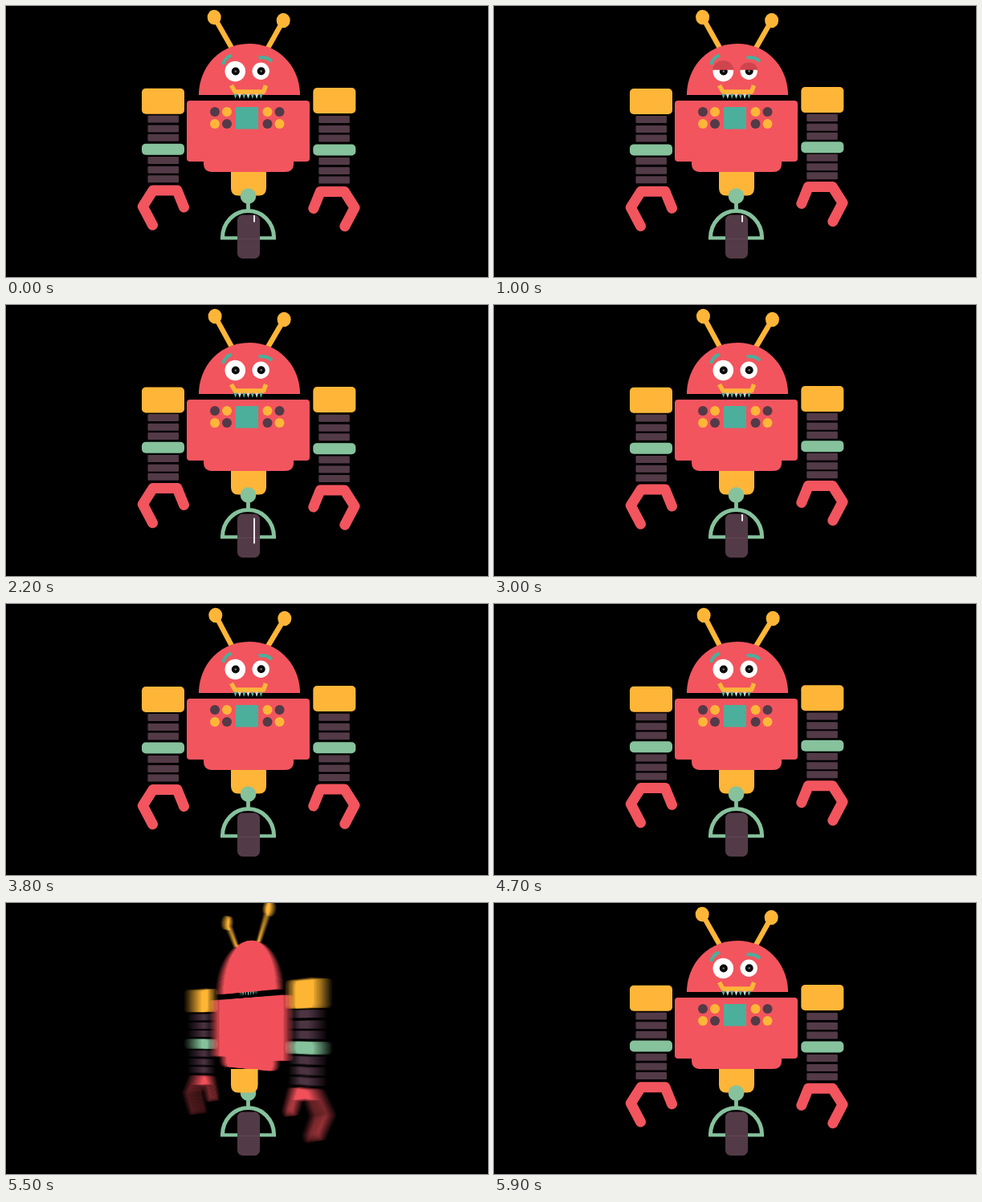
Write an HTML page that moves like this. It is 600x338 px and loops after 6000 ms.

```html
<!DOCTYPE html>
<html lang="en">
<head>
<meta charset="utf-8">
<title>Robot on one wheel</title>
<style>
html, body { margin: 0; width: 100%; height: 100%; overflow: hidden; background: #000; }
#stage { position: relative; width: 600px; height: 338px; overflow: hidden; background: #000; }
.layer { position: absolute; inset: 0; background: #000; perspective: 690px; perspective-origin: 301.5px 158px; }
.layer svg { transform-origin: 301.5px 158px; }
svg { position: absolute; left: 0; top: 0; display: block; overflow: visible; }
</style>
</head>
<body>
<div id="stage"></div>
<script>
const LOOP = 6000, STEP = 100, SAMPLES = 12;
const SPIN_START = 5240, SPIN_TIME = 650, SHUTTER = 15;
const RED = '#f2555e', GOLD = '#ffb638', DARK = '#533a47', MINT = '#86c29c', TEAL = '#4caf9b', LID = '#d0444e';
const NS = 'http://www.w3.org/2000/svg';
const TAU = Math.PI * 2;
const stage = document.getElementById('stage');

function addSvg(parent) {
  const svg = document.createElementNS(NS, 'svg');
  svg.setAttribute('width', 600);
  svg.setAttribute('height', 338);
  parent.appendChild(svg);
  return svg;
}

// Layer i at opacity 1/(i+1) averages all samples into motion blur.
const layers = Array.from({ length: SAMPLES }, (_, i) => {
  const box = document.createElement('div');
  box.className = 'layer';
  box.style.opacity = 1 / (i + 1);
  stage.appendChild(box);
  return { box, svg: addSvg(box) };
});
const base = addSvg(stage);

const clamp = v => Math.max(0, Math.min(1, v));
const rect = (x, y, w, h, r, fill) =>
  `<rect x="${x}" y="${y}" width="${w}" height="${h}" rx="${r}" fill="${fill}"/>`;
const oval = (x, y, rx, ry, fill) =>
  `<ellipse cx="${x}" cy="${y}" rx="${rx}" ry="${ry}" fill="${fill}"/>`;
const dot = (x, y, r, fill) => oval(x, y, r, r, fill);
const line = (d, width, color, cap = 'round') =>
  `<path d="${d}" fill="none" stroke="${color}" stroke-width="${width}" stroke-linecap="${cap}" stroke-linejoin="round"/>`;
const shape = (d, fill) => `<path d="${d}" fill="${fill}"/>`;

function spin(t) {
  const u = clamp((t - SPIN_START) / SPIN_TIME);
  return u * u * (3 - 2 * u);
}

// The arm contracts upward by `lift` at the claw, less toward the shoulder.
function arm(top, lift) {
  const y = v => v - lift * (0.15 + 0.85 * Math.pow((v - 102) / 123, 1.3));
  const bars = [137, 149, 160.5, 189, 201, 212.5]
    .map(v => rect(176.5, y(v), 38.5, 9, 1, DARK)).join('');
  return bars + rect(169, y(102) + top, 53, 32, 5, GOLD) + rect(169, y(172.5), 53, 14, 5, MINT) +
    `<g transform="translate(0 ${y(225)})">` +
    line('M182.5 49.8L170.3 26.5L183 6.5H213L221.5 27.5', 13, RED) + '</g>';
}

function antenna(x, y, footX, footY) {
  return line(`M${x} ${y}L${footX} ${footY}`, 6.5, GOLD, 'butt') + oval(x, y, 8.5, 9.3, GOLD);
}

function eye(x, y, r, shut) {
  let out = dot(x, y, r, '#fff') + dot(x + 0.5, y, 5, '#0a0a0a') + dot(x + 0.5, y, 1.2, '#777');
  if (shut > 0) {
    const R = r + 0.7, edge = y - R + 2 * R * shut;
    const half = Math.sqrt(Math.max(0, R * R - (edge - y) ** 2));
    out += shut >= 1 ? dot(x, y, R, LID)
      : shape(`M${x - half} ${edge}A${R} ${R} 0 ${shut > 0.5 ? 1 : 0} 1 ${x + half} ${edge}Z`, LID);
  }
  return out;
}

function teeth() {
  let out = '';
  for (let i = 0; i < 7; i++) {
    const x = 283 + i * 5.3;
    out += shape(`M${x} 108h5.2l-2.6 7.5z`, i % 2 ? '#b9d8d0' : TEAL);
  }
  return out;
}

function face(shut) {
  const buttons = [[260, 132, 0], [275, 132, 1], [260, 147, 1], [275, 147, 0],
    [325.5, 132, 1], [340.5, 132, 0], [325.5, 147, 0], [340.5, 147, 1]]
    .map(([x, y, lit]) => dot(x, y, 6, lit ? GOLD : DARK)).join('');
  return eye(285.3, 81.5, 12.8, shut) + eye(317.2, 81.3, 10.7, shut) +
    line('M270 73Q272 64.5 281 61.5', 4.2, TEAL, 'butt') +
    line('M314.5 64.5Q324 63 331 69', 4.2, TEAL, 'butt') +
    teeth() + line('M280.5 99L285 107H320.5L323.5 99', 5.6, GOLD, 'butt') +
    buttons + rect(286, 126, 28, 27.5, 0.5, TEAL);
}

function body(t, back) {
  const sway = t / 2400 * (1 - spin(t));
  const shut = clamp(1 - Math.abs(t - 1110) / 195);
  const leftLift = 1.5 - 1.5 * Math.sin(TAU * t / 3000);
  const rightLift = 3 - 3 * Math.cos(TAU * t / 2000);
  return arm(1, leftLift) +
    `<g transform="translate(604.3 0) scale(-1 1)">${arm(0, rightLift)}</g>` +
    antenna(259.2 + sway, 14, 282, 54) + antenna(345.2 + sway, 18, 324, 56) +
    teeth() + shape('M240 111V108C242 73 268 47 303 47S364 73 366 108V111Z', RED) +
    shape('M229 118H374Q378 118 378 122V190Q378 194 374 194H358V197Q358 207 347 207H257Q246 207 246 197V194H229Q225 194 225 190V122Q225 118 229 118Z', RED) +
    (back ? '' : face(shut));
}

function shine(t) {
  const p = (t / 1000 + 0.06) % 1;
  const head = Math.min(314, 261 + 140 * p);
  const tail = 261 + 53 * Math.pow(clamp((p - 0.2) / 0.3), 1.5);
  return head > tail ? line(`M309 ${tail}V${head}`, 1.8, '#fff', 'butt') : '';
}

function unicycle(t, angle) {
  const right = 324 - 13 * Math.abs(Math.sin(angle));
  const post = shape(`M280 207H${right}V227Q${right} 236.5 ${right - 9} 236.5H289Q280 236.5 280 227Z`, GOLD);
  const ball = dot(301.5, 237, 9.8, MINT);
  return (Math.cos(angle) < 0 ? ball + post : post + ball) +
    line('M301.5 244V256', 4.8, MINT, 'butt') +
    line('M269.5 289A32 33.5 0 0 1 333.5 289', 5, MINT, 'butt') +
    line('M267 289.3H336', 4.2, MINT, 'butt') +
    rect(288, 260.5, 28, 54.5, 6.5, DARK) +
    line('M288.5 290.5H315.5', 0.7, '#65505a', 'butt') + shine(t);
}

function draw(t) {
  const moving = t > SPIN_START && t < SPIN_START + SPIN_TIME;
  layers.forEach(({ box, svg }, i) => {
    const used = i === 0 || moving;
    box.style.display = used ? 'block' : 'none';
    if (!used) return;
    const shift = moving ? (i / (SAMPLES - 1) - 0.5) * SHUTTER : 0;
    const angle = TAU * spin(t + shift);
    svg.innerHTML = body(t, Math.cos(angle) < 0);
    svg.style.transform = moving ? `rotateY(${angle}rad)` : 'none';
  });
  base.innerHTML = unicycle(t, TAU * spin(t));
}

const begin = performance.now();
let last = -1;
function tick() {
  const t = Math.floor(((performance.now() - begin) % LOOP) / STEP) * STEP;
  if (t !== last) draw(last = t);
  requestAnimationFrame(tick);
}
tick();
</script>
</body>
</html>
```
